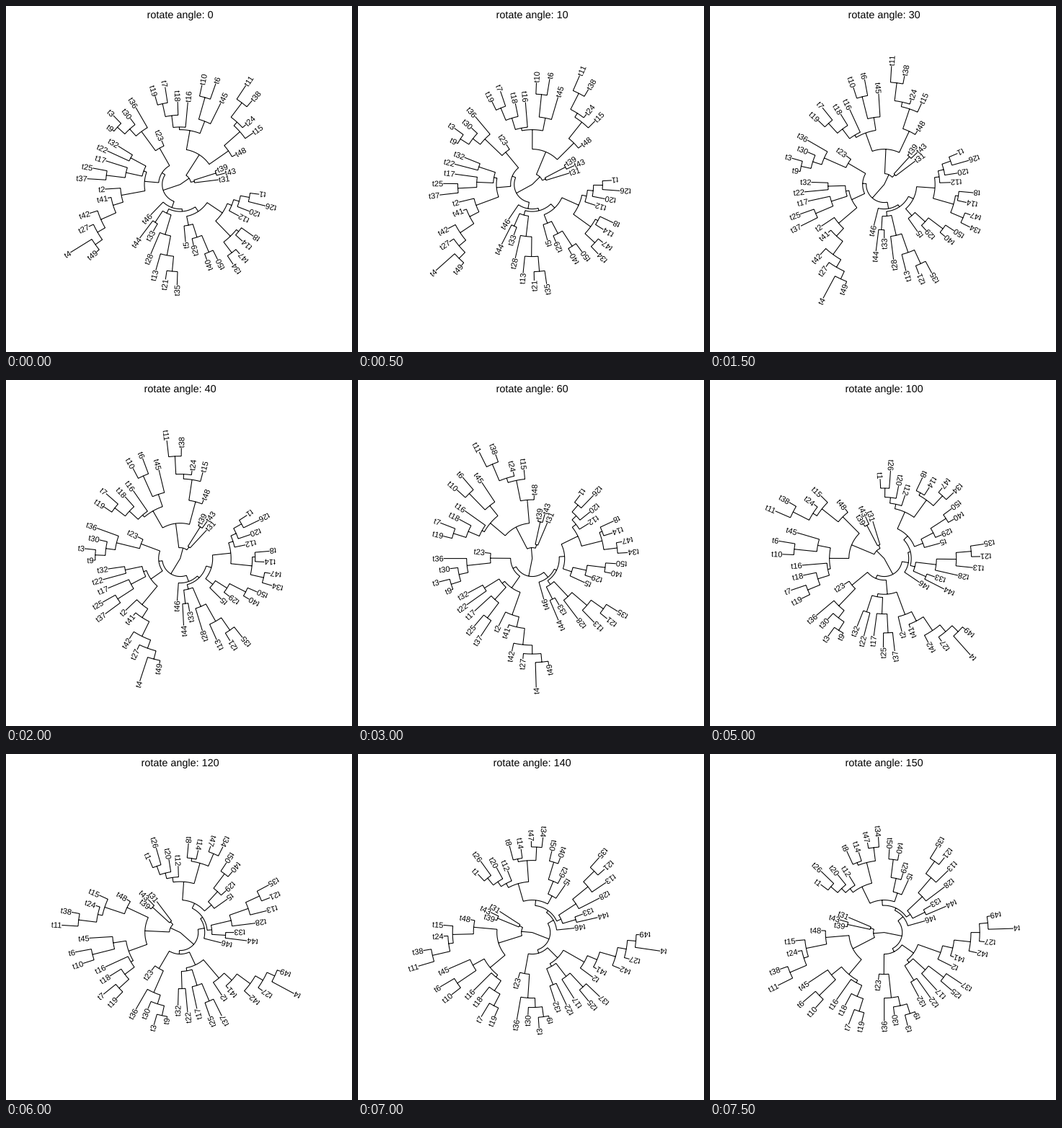
Write a matplotlib script that moves like this. It is 480 px wide and 480 px high and loops after 8000 ms.

```python
import numpy as np
import matplotlib.pyplot as plt
from matplotlib.animation import FuncAnimation
from matplotlib.patches import PathPatch
from matplotlib.path import Path
from matplotlib.textpath import TextPath
from matplotlib.transforms import Affine2D

SIZE, DPI = 480, 100
CENTER = (241.7, SIZE - 247.6)
TIPS = 50
STEP_DEG = 360 / (TIPS + 1)
FONT = {"family": "Liberation Sans"}
LABEL_PX, TITLE_PX = 11.04, 14.4


class Node:
    """Tree node; r is its distance from the root in pixels."""

    def __init__(self, r, name=None, kids=()):
        self.r, self.name, self.kids = r, name, kids
        self.deg = 0


def tip(number, r):
    return Node(r, f"t{number}")


def join(r, a, b):
    return Node(r, kids=(a, b))


# Clades, counter-clockwise from the right
trio = join(20, tip(31, 53.8), join(52, tip(43, 64), tip(39, 55)))
north_east = join(81.5, tip(48, 87.5), join(
    110.5, tip(15, 123.7), join(
        117, tip(24, 123), join(142, tip(38, 153.3), tip(11, 164.7)))))
north = join(
    76,
    join(94, tip(45, 126.3), join(125.5, tip(6, 148.4), tip(10, 141.3))),
    join(79.7, tip(16, 114.5), join(
        96.3, tip(18, 115), join(114.7, tip(7, 136.7), tip(19, 127.3)))))
north_west = join(58, tip(23, 66.3), join(
    91, tip(36, 123), join(
        104, tip(30, 115), join(118, tip(3, 133.4), tip(9, 120.1)))))
west = join(
    54,
    join(78, tip(32, 101.3), tip(22, 111.3)),
    join(77, tip(17, 108.3), join(103.3, tip(25, 123.5), tip(37, 129.3))))
south_west = join(83, tip(2, 104.6), join(
    97.5, tip(41, 102.3), join(
        120.3, tip(42, 131.8), join(
            132.5, tip(27, 139.8), join(144.3, tip(4, 179.2), tip(49, 148.8))))))
south = join(
    44,
    join(63, tip(44, 93.2), tip(33, 74.8)),
    join(72.5, tip(28, 105), join(
        100, tip(13, 123.7), join(121, tip(21, 133.3), tip(35, 139.5)))))
south_east = join(57.7, tip(5, 80.2), join(
    76.8, tip(29, 86.3), join(102, tip(40, 111), tip(50, 116.3))))
east = join(
    70.5,
    join(100, join(118.7, tip(34, 132.8), tip(47, 126.8)),
         join(104, tip(14, 116.8), tip(8, 124.4))),
    join(77, tip(12, 92.3), join(
        85, tip(20, 102.8), join(97.6, tip(26, 122), tip(1, 110.4)))))

root = join(
    0,
    join(15, trio, join(49, north_east, north)),
    join(25,
         join(30, north_west, join(49.7, west, south_west)),
         join(34, tip(46, 58.8), join(37.5, south, join(45, south_east, east)))))


def lay_out(node, leaves):
    """Space the tips evenly and put each parent midway between its children."""
    if node.name:
        leaves.append(node)
        node.deg = len(leaves) * STEP_DEG
    else:
        for kid in node.kids:
            lay_out(kid, leaves)
        node.deg = sum(k.deg for k in node.kids) / 2
    return leaves


def polar(r, deg):
    a = np.radians(deg)
    return np.column_stack([r * np.cos(a), r * np.sin(a)])


def branches(node):
    """Radial lines to the children and the arc that links them."""
    if not node.kids:
        return []
    first, last = (k.deg for k in node.kids)
    lines = []
    if node.r:
        count = max(3, int((last - first) / 2))
        lines.append(Path(polar(node.r, np.linspace(first, last, count))))
    for kid in node.kids:
        radii = np.array([node.r, kid.r])
        lines.append(Path(polar(radii, np.full(2, kid.deg))))
        lines += branches(kid)
    return lines


def text_path(s, px):
    return TextPath((0, 0), s, size=px, prop=FONT)


leaves = lay_out(root, [])

fig = plt.figure(figsize=(SIZE / DPI, SIZE / DPI), dpi=DPI, facecolor="white")
ax = fig.add_axes([0, 0, 1, 1])
ax.set(xlim=(0, SIZE), ylim=(0, SIZE))
ax.axis("off")

tree = PathPatch(Path.make_compound_path(*branches(root)), fill=False,
                 edgecolor="black", linewidth=1.07 * 72 / DPI, snap=False)
ax.add_patch(tree)

labels = []
for leaf in leaves:
    path = text_path(leaf.name, LABEL_PX)
    patch = PathPatch(path, facecolor="black", linewidth=0, snap=False)
    ax.add_patch(patch)
    labels.append((leaf, patch, path.get_extents().x1 + 0.5))

title = PathPatch(text_path("0", TITLE_PX), facecolor="black", linewidth=0,
                  snap=False)
ax.add_patch(title)


def draw(i):
    turn = 10 * i
    tree.set_transform(
        Affine2D().rotate_deg(turn).translate(*CENTER) + ax.transData)

    for leaf, patch, width in labels:
        deg = leaf.deg + turn
        place = Affine2D().translate(0, -0.358 * LABEL_PX)
        if deg >= 90:
            place.translate(-width, 0).rotate_deg(180)
        place.translate(leaf.r, 0).rotate_deg(deg).translate(*CENTER)
        patch.set_transform(place + ax.transData)

    path = text_path(f"rotate angle: {turn}", TITLE_PX)
    box = path.get_extents()
    title.set_path(path)
    title.set_transform(
        Affine2D().translate(241.8 - (box.x0 + box.x1) / 2, SIZE - 17)
        + ax.transData)
    return [tree, title]


anim = FuncAnimation(fig, draw, frames=16, interval=500, repeat=True,
                     repeat_delay=0, blit=False)
plt.show()
```
